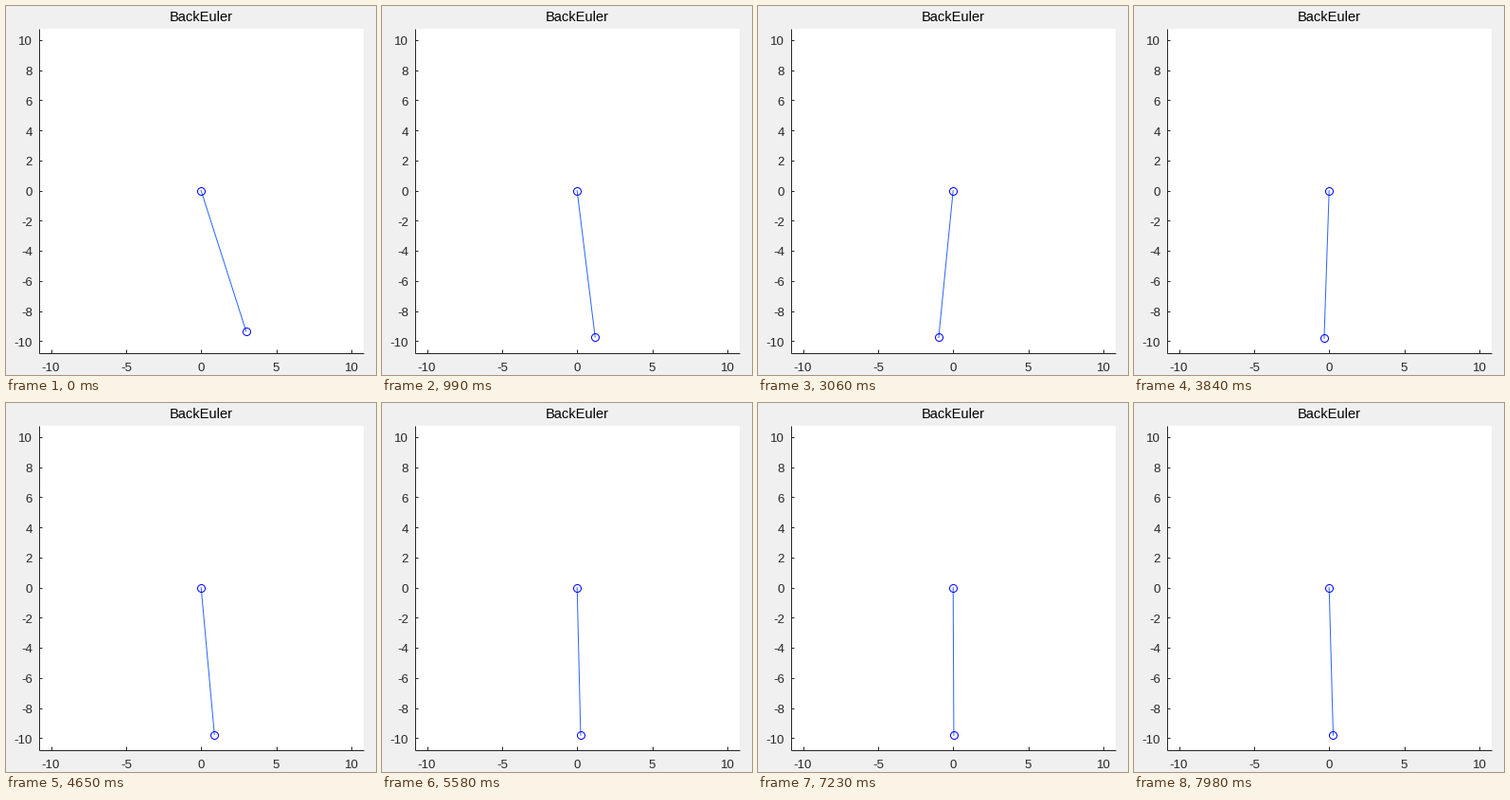
A matplotlib script that plays this animation: 391x389 px, repeating every 8 s.

```python
import numpy as np
import matplotlib.pyplot as plt
from matplotlib.animation import FuncAnimation
from matplotlib.patches import Rectangle

W, H, DPI = 391, 389, 128
PX = 72 / DPI                      # points per pixel
CX, CY, UNIT = 206.2, 194.7, 15.87   # pivot and pixels per axis unit
LEFT, RIGHT, TOP, BOTTOM = 34.5, 377.5, 23.5, 365.5
LENGTH = 9.8
INK, BLUE, ROD = "#262626", "#0000ff", "#2a66ff"

# damped swing
AMP, DECAY = 0.3125, 0.154 / 578    # rad, 1/ms
RATE, PHASE = 0.001732, -0.036      # half turns per ms, half turns

plt.rcParams["font.family"] = "Liberation Sans"
fig = plt.figure(figsize=(W / DPI, H / DPI), dpi=DPI, facecolor="#f0f0f0")
ax = fig.add_axes([0, 0, 1, 1])
ax.set_xlim(0, W)
ax.set_ylim(H, 0)
ax.axis("off")


def segment(x, y):
    ax.plot(x, y, color=INK, lw=PX, solid_capstyle="butt", snap=True)


def label(x, y, text, size, color=INK, ha="center"):
    ax.text(x, y, text, fontsize=size * PX, color=color, ha=ha, va="baseline")


def swing(t):
    """Angle at t ms; large swings are slightly slower."""
    lag = AMP**2 / 16 * (1 - np.exp(-2 * DECAY * t)) / (2 * DECAY)
    turns = RATE * (t - lag) + PHASE
    return AMP * np.exp(-DECAY * t) * np.cos(np.pi * turns)


ax.add_patch(Rectangle((LEFT, TOP), RIGHT - LEFT, BOTTOM - TOP,
                       fc="white", ec="none"))
segment([LEFT, LEFT], [TOP, BOTTOM])
segment([LEFT, RIGHT], [BOTTOM, BOTTOM])

for v in range(-10, 11, 5):
    x = CX + v * UNIT
    segment([x, x], [BOTTOM, BOTTOM - 3.5])
    label(x, 385, str(v), 13.33)
for v in range(-10, 11, 2):
    y = CY - v * UNIT
    segment([LEFT, LEFT + 3.5], [y, y])
    label(28, y + 5.3, str(v), 13.33, ha="right")
label(CX, 16.2, "BackEuler", 14.67, color="black")

rod, = ax.plot([], [], color=ROD, lw=PX, zorder=3)
ends, = ax.plot([], [], "o", ms=8 * PX, mfc="none", mec=BLUE, mew=PX, zorder=4)


def update(i):
    t = 30 * ((2 * i + 1) // 3)     # pose changes every 30 ms
    a = swing(t)
    x = [CX, CX + LENGTH * UNIT * np.sin(a)]
    y = [CY, CY + LENGTH * UNIT * np.cos(a)]
    rod.set_data(x, y)
    ends.set_data(x, y)
    return rod, ends


anim = FuncAnimation(fig, update, frames=400, interval=20,
                     init_func=lambda: update(0), repeat=True, repeat_delay=0)
plt.show()
```
